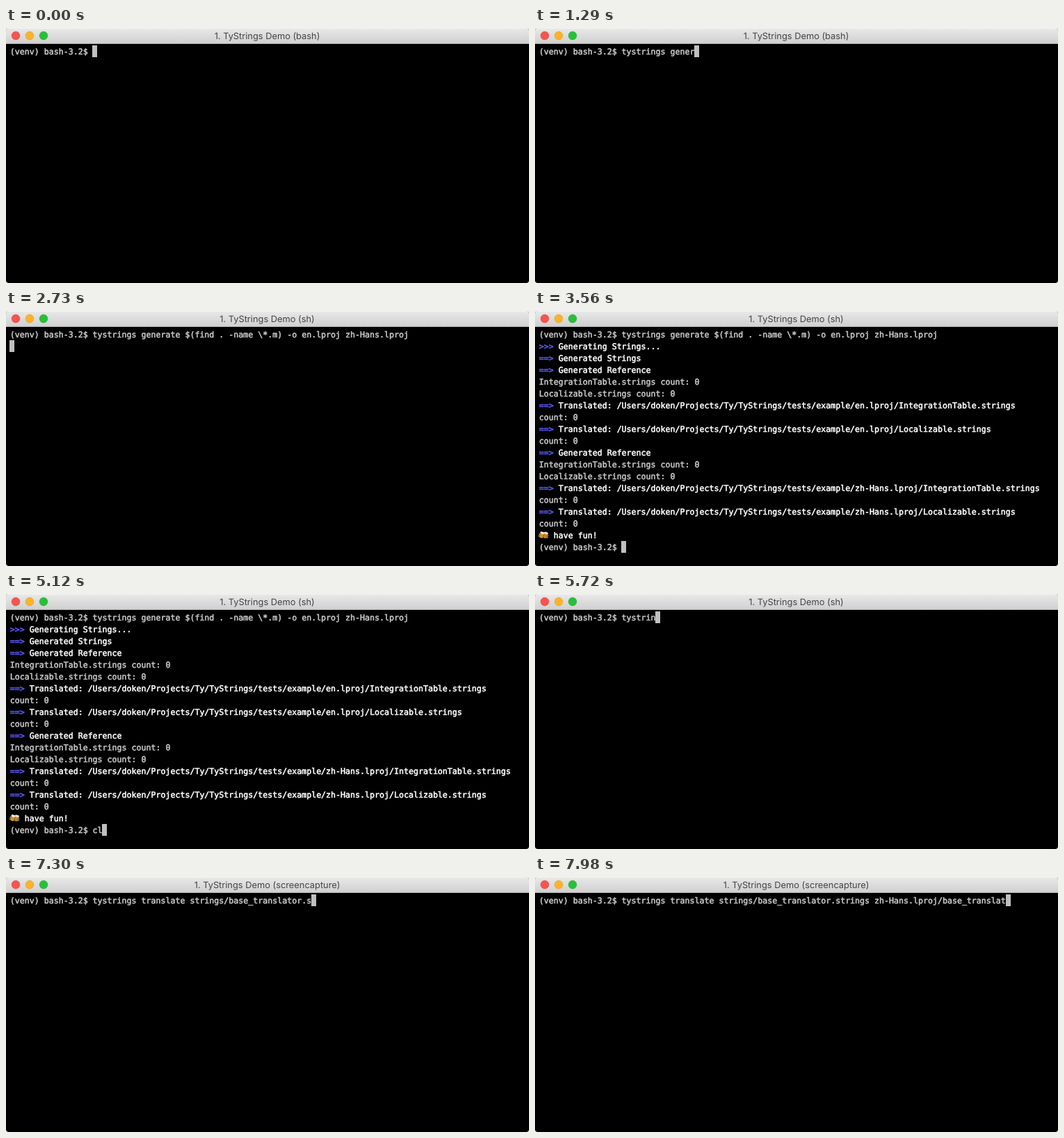
Animation, 752 px wide and 367 px high, one loop 8 s. Source, as an HTML page:

```html
<!DOCTYPE html>
<html lang="en">
<head>
<meta charset="utf-8">
<title>Terminal demo</title>
<style>
  html, body { margin: 0; width: 100%; height: 100%; overflow: hidden; background: #fff; }
  svg { display: block; width: 752px; height: 367px; }
  text { white-space: pre; text-rendering: geometricPrecision; }
  .title { font: 12.83px Inter, Roboto, sans-serif; fill: #444; text-anchor: middle; }
  .row { font: 11.627px "DejaVu Sans Mono", monospace; fill: #c7c7c7; stroke: #c7c7c7; stroke-width: .55; }
  .strong { fill: #fff; stroke: #fff; }
  .mark { fill: #5c5cff; stroke: #5c5cff; }
</style>
</head>
<body>
<svg viewBox="0 0 752 367">
  <defs>
    <linearGradient id="bar" x2="0" y2="1">
      <stop offset="0" stop-color="#e9e9e9"/>
      <stop offset="1" stop-color="#d0d0d0"/>
    </linearGradient>
    <clipPath id="window"><rect width="752" height="367" rx="4"/></clipPath>
  </defs>
  <g clip-path="url(#window)">
    <rect width="752" height="367"/>
    <rect width="752" height="22" fill="url(#bar)"/>
    <rect width="752" height="1" fill="#f3f3f3"/>
    <rect y="22" width="752" height="1" fill="#aeaeae"/>
    <g stroke-width=".6">
      <circle cx="14" cy="11" r="5.9" fill="#f6544f" stroke="#dc4340"/>
      <circle cx="34" cy="11" r="5.9" fill="#fbb32b" stroke="#dd9a24"/>
      <circle cx="54" cy="11" r="5.9" fill="#28c03a" stroke="#1fa62e"/>
    </g>
    <text class="title" id="title" x="375.5" y="16"></text>
    <g id="rows"></g>
    <g id="beer">
      <g transform="rotate(16 9 323)">
        <rect x="7" y="319.5" width="5" height="7" rx="1" fill="#d8932a"/>
        <rect x="6.5" y="317.5" width="6" height="3.2" rx="1.5" fill="#f6e9cc"/>
        <path d="M7 321.5h-1v3.5h1" fill="none" stroke="#c9b48a"/>
      </g>
      <g transform="rotate(16 15 323)">
        <rect x="12.5" y="320" width="5" height="7" rx="1" fill="#c98125"/>
        <rect x="12" y="318" width="6" height="3.2" rx="1.5" fill="#f1e0ba"/>
        <path d="M17.5 322h1v3.5h-1" fill="none" stroke="#c9b48a"/>
      </g>
    </g>
    <rect id="cursor" width="7" height="17" fill="#c0c0c0"/>
  </g>
</svg>
<script>
const LOOP = 8000, LEFT = 5, TOP = 25, CELL = 7, LINE = 17;
const TEXT_LEFT = LEFT + .8, BASELINE = TOP + 13;
const PROMPT = '(venv) bash-3.2$ ';
const GENERATE = 'tystrings generate $(find . -name \\*.m) -o en.lproj zh-Hans.lproj ';
const TRANSLATE = 'tystrings translate strings/base_translator.strings zh-Hans.lproj/base_translator.strings';

const tables = ['IntegrationTable', 'Localizable'];
const languageLog = lang => [
  '==> Generated Reference',
  ...tables.map(name => `${name}.strings count: 0`),
  ...tables.flatMap(name => [
    `==> Translated: /Users/doken/Projects/Ty/TyStrings/tests/example/${lang}.lproj/${name}.strings`,
    'count: 0'
  ])
];
const CHEERS = '   have fun!';
const LOG = [
  '>>> Generating Strings...',
  '==> Generated Strings',
  ...languageLog('en'),
  ...languageLog('zh-Hans'),
  CHEERS
];

// [start time, value] pairs; the last one already started applies
const TITLES = [[0, 'bash'], [1790, 'screencapture'], [2730, 'sh'], [5820, 'bash'],
  [6420, 'screencapture'], [7480, 'bash'], [7820, 'screencapture']];
const LOG_SIZES = [[2730, 0], [3210, 1], [3310, 3], [3410, 9], [3510, 12], [3530, 16], [3560, LOG.length]];
const CLEAR_TYPED = [[0, 0], [5120, 2], [5220, 4], [5320, 5]];
const at = (steps, t) => steps.filter(([start]) => start <= t).pop()[1];
const ticks = (t, start, gap) => Math.floor((t - start) / gap) + 1;

function generateTyped(t) {
  if (t < 490) return 0;
  if (t < 1390) return Math.round(ticks(t, 490, 100) * 15 / 9);
  if (t < 1790) return 15 + ticks(t, 1390, 100);
  return 19 + ticks(t, 1790, 20);
}

function translateTyped(t) {
  if (t < 6020) return Math.floor(ticks(t, 5520, 100) * 2.5 - .5);
  if (t < 6840) return 12 + ticks(t, 6020, 100);
  return 21 + ticks(t, 6840, 20);
}

function screen(t) {
  if (t < 2730) return [PROMPT + GENERATE.slice(0, generateTyped(t))];
  if (t >= 5520) return [PROMPT + TRANSLATE.slice(0, translateTyped(t))];
  const lines = [PROMPT + GENERATE, ...LOG.slice(0, at(LOG_SIZES, t))];
  if (t < 3560) return [...lines, ''];
  lines.push(PROMPT + 'clear'.slice(0, at(CLEAR_TYPED, t)));
  return t < 5420 ? lines : [...lines, ''];
}

const el = id => document.getElementById(id);
function add(parent, tag, attrs, content = '') {
  const node = document.createElementNS('http://www.w3.org/2000/svg', tag);
  for (const key in attrs) node.setAttribute(key, attrs[key]);
  node.textContent = content;
  return parent.appendChild(node);
}

function drawRow(line, index) {
  const row = add(el('rows'), 'text', { class: 'row', x: TEXT_LEFT, y: BASELINE + index * LINE });
  if (/^(>>>|==>)/.test(line)) {
    add(row, 'tspan', { class: 'mark' }, line.slice(0, 3));
    add(row, 'tspan', { class: 'strong' }, line.slice(3));
  } else if (line === CHEERS) {
    row.setAttribute('x', TEXT_LEFT + 3 * CELL);
    add(row, 'tspan', { class: 'strong' }, line.trim());
  } else {
    row.textContent = line;
  }
}

let shown;
function render(t) {
  const lines = screen(t), title = `1. TyStrings Demo (${at(TITLES, t)})`;
  const state = title + lines.join('\n');
  if (state === shown) return;
  shown = state;
  el('title').textContent = title;
  el('rows').replaceChildren();
  lines.forEach(drawRow);
  el('beer').style.display = lines.includes(CHEERS) ? '' : 'none';
  const last = lines.length - 1;
  el('cursor').setAttribute('x', LEFT + lines[last].length * CELL);
  el('cursor').setAttribute('y', TOP + last * LINE);
}

const began = performance.now();
function frame() {
  render((performance.now() - began) % LOOP);
  requestAnimationFrame(frame);
}
frame();
</script>
</body>
</html>
```
